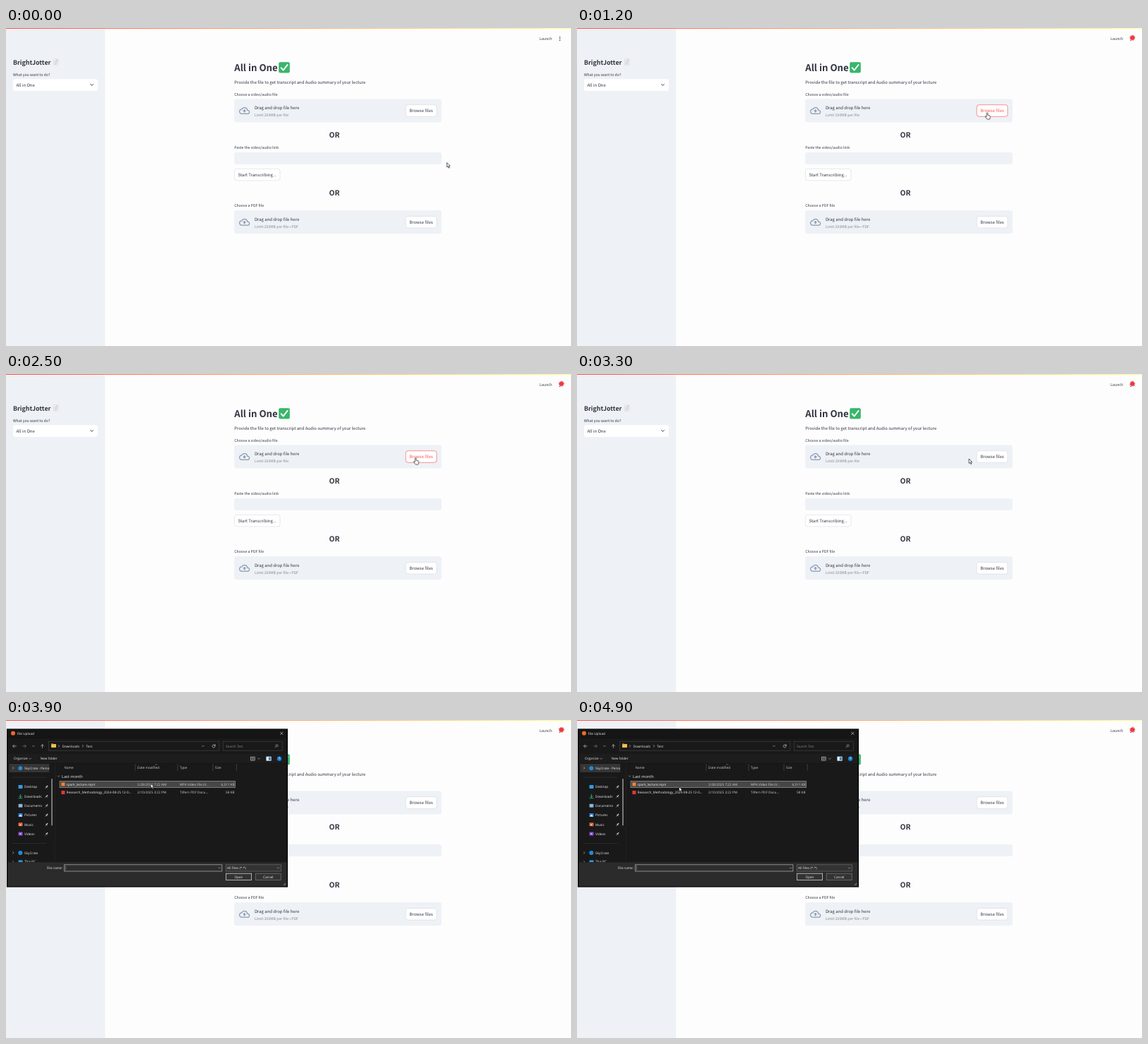
An HTML page that plays this animation: 800 px wide and 450 px high, repeating every 5 s.

```html
<!DOCTYPE html>
<html lang="en">
<head>
<meta charset="utf-8">
<title>Lecture upload</title>
<style>
html, body { margin: 0; width: 100%; height: 100%; overflow: hidden; background: #fdfdfe; }
svg { display: block; width: 800px; height: 450px; }
text { text-rendering: geometricPrecision; white-space: pre; }
.page { font-family: "Noto Sans CJK JP", "Noto Sans CJK SC", "Noto Sans CJK KR", "Noto Sans CJK", "Noto Sans", sans-serif; fill: #31333f; }
.win { font-family: "Open Sans", "Noto Sans", sans-serif; fill: #ececec; }
.line { fill: none; stroke-linecap: round; stroke-linejoin: round; }
</style>
</head>
<body>
<svg id="stage" viewBox="0 0 800 450" xmlns="http://www.w3.org/2000/svg"></svg>
<script>
const LOOP = 5000, STEP = 100;
const PANEL = '#eef1f5', RED = '#ff4b4b';
const BODY = 5.96, SMALL = 5.22;

const text = (cls, x, y, size, str, extra = '') =>
  `<text class="${cls}" x="${x}" y="${y}" font-size="${size}" ${extra}>${str}</text>`;
const page = (...a) => text('page', ...a);
const win = (x, y, str, extra = '', size = 4.7) => text('win', x, y, size, str, extra);
const rect = (x, y, w, h, fill, extra = '') =>
  `<rect x="${x}" y="${y}" width="${w}" height="${h}" fill="${fill}" ${extra}/>`;
const line = (d, stroke, w = .6) => `<path class="line" d="${d}" stroke="${stroke}" stroke-width="${w}"/>`;
const dot = (x, y, r, fill) => `<circle cx="${x}" cy="${y}" r="${r}" fill="${fill}"/>`;
const group = (id, body, extra = '') => `<g id="${id}" ${extra}>${body}</g>`;
const MID = 'text-anchor="middle"', END = 'text-anchor="end"';
const GREY = 'style="fill:#85878f"';

function button(id, x, y, w, label) {
  return group(id,
    rect(x, y, w, 16.6, '#fff', 'rx="3.3" stroke="#d5d7dc" stroke-width=".6"') +
    page(x + w / 2, y + 10.5, BODY, label, MID));
}

function dropzone(id, y, limit) {
  const cloud = 'M19.35 10.04A7.49 7.49 0 0 0 12 4C9.11 4 6.6 5.64 5.35 8.04A5.994 5.994 0 0 0 0 14c0 3.31 2.69 6 6 6h13' +
    'c2.76 0 5-2.24 5-5 0-2.64-2.05-4.78-4.65-4.96zM19 18H6c-2.21 0-4-1.79-4-4 0-2.05 1.53-3.76 3.56-3.97l1.07-.11.5-.95' +
    'A5.469 5.469 0 0 1 12 6c2.62 0 4.88 1.86 5.39 4.43l.3 1.5 1.53.11A2.98 2.98 0 0 1 22 15c0 1.65-1.35 3-3 3z' +
    'M8 13h2.55v3h2.9v-3H16l-4-4z';
  return rect(323.2, y, 293.6, 33, PANEL, 'rx="3.3"') +
    `<path d="${cloud}" fill="#8c9cb2" fill-rule="evenodd" transform="translate(330 ${y + 9}) scale(.635)"/>` +
    page(352, y + 14.9, BODY, 'Drag and drop file here') +
    page(352, y + 25, SMALL, limit, GREY) +
    button(id, 566, y + 8.3, 43.8, 'Browse files');
}

function pageView() {
  const sidebar = rect(0, 0, 140, 450, PANEL) +
    page(10, 51.5, 8.8, 'BrightJotter', 'font-weight="600"') +
    rect(67.5, 43.6, 6.6, 8.8, '#f8f9fb', 'rx=".6" stroke="#c3c9d2" stroke-width=".5"') +
    line('M69 46h2.4M69 47.8h3.6M69 49.4h3.6M69 51h2.4', '#9fabbd', .6) +
    rect(71.6, 44.8, 1.5, 1.6, '#e09aa6') +
    page(10, 67.8, SMALL, 'What you want to do?') +
    rect(10, 72.2, 120, 16.8, '#fff', 'rx="3.3"') +
    page(14.5, 82.9, BODY, 'All in One') +
    line('M119.7 79.6l1.8 1.8 1.8-1.8', '#31333f', 1);
  const main = page(323.2, 61.1, 13.2, 'All in One', 'font-weight="600"') +
    rect(386.2, 48.2, 15.6, 15.2, '#38b66a', 'rx="2"') +
    line('M389.6 56.4l3 3.2 6-7.6', '#fff', 2) +
    page(323.2, 79.2, BODY, 'Provide the file to get transcript and Audio summary of your lecture') +
    page(323.2, 95.8, SMALL, 'Choose a video/audio file') +
    dropzone('browse', 100.4, 'Limit 200MB per file') +
    page(465, 155, 10.2, 'OR', MID + ' font-weight="600"') +
    page(323.2, 171.3, SMALL, 'Paste the video/audio link') +
    rect(323.2, 176, 293.6, 16.7, PANEL, 'rx="3.3"') +
    button('start', 323.4, 199.3, 64.6, 'Start Transcribing...') +
    page(465, 237, 10.2, 'OR', MID + ' font-weight="600"') +
    page(323.2, 253.3, SMALL, 'Choose a PDF file') +
    dropzone('browsePdf', 258.1, 'Limit 200MB per file • PDF');
  const bar = rect(0, 0, 800, 1, 'url(#bar)') + page(755.2, 17.1, SMALL, 'Launch') +
    group('kebab', [12.8, 15.1, 17.4].map(y => dot(784.2, y, .75, '#31333f')).join('')) +
    '<path id="burst" fill="#ee3a3c"/>';
  return sidebar + main + bar;
}

function places() {
  const items = [['Desktop', '#2f9be8'], ['Downloads', '#2fae74'], ['Documents', '#6f9fc8'],
    ['Pictures', '#2f86dd'], ['Music', '#e2683c'], ['Videos', '#8a4fd0']];
  const icon = (i, y, c) => {
    if (i === 1) return line(`M20.5 ${y - 2.6}v4M18.7 ${y - .2}l1.8 1.8 1.8-1.8M18 ${y + 2.8}h5`, c, .9);
    const mark = i === 2 ? line(`M19 ${y - 1}h3M19 ${y + .8}h3`, '#fff', .5)
      : i === 3 ? `<path d="M18 ${y + 2}l2.5-2.8 2.5 2.8z" fill="#fff"/>`
      : i === 4 ? dot(20.3, y + .5, .9, '#fff')
      : i === 5 ? `<path d="M19.7 ${y - 1.2}v2.4l2-1.2z" fill="#fff"/>` : '';
    return rect(17.5, y - 2.5, 6, 5, c, 'rx=".8"') + mark;
  };
  const pin = y => line(`M55.6 ${y + 2}l1.6-1.6M56.4 ${y - .6}l2 2`, '#c9c9c9', .6) +
    line(`M57.3 ${y + .2}l1.5-1.5`, '#c9c9c9', 1.3);
  return items.map(([name, c], i) => {
    const y = 94.6 + i * 13.3;
    return icon(i, y, c) + win(26, y + 1.7, name) + pin(y);
  }).join('');
}

function dialogView() {
  const chev = (x, y, c = '#bbb') => line(`M${x - 1.4} ${y - .7}l1.4 1.4 1.4-1.4`, c);
  const next = (x, y) => line(`M${x - .7} ${y - 1.4}l1.4 1.4-1.4 1.4`, '#ccc');
  const box = (x, y, w, h, fill, stroke, sw = .6) => rect(x, y, w, h, fill, `stroke="${stroke}" stroke-width="${sw}"`);
  const head = rect(1, 12.4, 398, 224.2, '#0b0b0b') + rect(2.5, 13.5, 395, 12, '#151515') +
    dot(10, 18.8, 3, '#f0682c') + win(15.5, 20.6, 'File Upload') +
    line('M388.6 17.2l3.4 3.4M392 17.2l-3.4 3.4', '#eee') +
    rect(2.5, 25.5, 395, 22.5, '#191919') +
    line('M14.3 37h-4.6M11.6 35l-2 2 2 2M49.5 36.8l2-2 2 2M51.5 35v4.4', '#ddd') +
    line('M23.7 37h4.6M26.4 35l2 2-2 2', '#888') + chev(39, 37) +
    box(60.3, 30.2, 241.6, 13, '#191919', '#484848') +
    rect(64, 34, 7, 5, '#f2c04c', 'rx=".7"') + rect(64, 33.4, 3, 1.6, '#d99a2b') +
    next(75, 36.8) + win(79.5, 38.5, 'Downloads') + next(109, 36.8) + win(113.3, 38.5, 'Test') +
    chev(279, 37) + line('M296 36.1a2.1 2.1 0 1 0 .1 1.6M296.2 34.6v1.7h-1.7', '#ddd') +
    box(307.2, 30.2, 84, 13, '#191919', '#484848') +
    win(311, 38.5, 'Search Test', 'style="fill:#858585"') +
    `<circle cx="383.6" cy="36.2" r="1.5" fill="none" stroke="#bbb" stroke-width=".6"/>` + line('M382.5 37.3l-1.5 1.6', '#bbb');
  const tools = rect(2.5, 48, 395, 13.3, '#1d1d1d') +
    box(368.8, 52, 6.4, 5.4, '#e8eef4', '#e8eef4') + rect(371.8, 52.6, 3, 4.2, '#2b84c8') +
    dot(387, 54.7, 3.2, '#1683d8') + win(387, 56.4, '?', MID + ' font-weight="700"');
  const body = rect(2.5, 61.3, 395, 140, '#191919') +
    line('M69.2 62v138', '#2d2d2d', .5) +
    line('M183 62.5v9M243 62.5v9M293 62.5v9M326.3 62.5v9', '#555', .6) +
    [[82.5, 'Name'], [186, 'Date modified'], [246, 'Type'], [296, 'Size']]
      .map(([x, s]) => win(x, 68.5, s, 'style="fill:#d2d2d2"')).join('') +
    rect(4.5, 62, 56.8, 12, '#353535') + next(10.3, 68) + dot(20.3, 68.2, 3, '#2389d8') +
    `<g clip-path="url(#side)">` + win(26, 69.7, 'SkyCrate - Personal') +
    next(10.3, 187.8) + dot(20.3, 188, 3, '#2389d8') + win(26, 189.5, 'SkyCrate') +
    next(10.3, 201) + rect(17.5, 198.5, 6, 4, '#2f9be8') + win(26, 202.2, 'This PC') + '</g>' +
    line('M9 81.2h48M9 174.5h48', '#3a3a3a', .5) + places() +
    rect(64.3, 83, 1.4, 66.5, '#a2a2a2', 'rx=".7"');
  const foot = rect(2.5, 201.2, 395, 34, '#2b2b2b') +
    win(80, 210.8, 'File name:', END) +
    box(82.3, 204.8, 223.6, 9.2, '#2d2d2d', '#b5b5b5', .7) + line('M84.3 206.7v5.4', '#eee', .4) +
    chev(302.5, 209.5) +
    box(311.2, 204.8, 78.2, 9.2, '#333', '#777') + win(313, 210.8, 'All Files (*.*)') + chev(385.5, 209.5) +
    box(311.4, 217.2, 36.2, 9.4, '#333', '#d0d0d0', .8) + win(329.4, 223.6, 'Open', MID) +
    box(353.2, 217.2, 36, 9.4, '#333', '#858585') + win(371.3, 223.6, 'Cancel', MID) +
    line('M393 233.8l2.8-2.8M394.7 233.8l1.1-1.1', '#aaa', .7);

  const row = (y, name, date, type, size) =>
    win(85.5, y, name) + win(186, y, date, 'style="fill:#d2d2d2"') +
    win(246, y, type, 'style="fill:#d2d2d2"') + win(323.5, y, size, END + ' style="fill:#d2d2d2"');
  const files = win(11, 56.4, 'Organize') + chev(34.2, 54.8) + win(48.7, 56.4, 'New folder') +
    box(346.5, 52.2, 5.6, 5, 'none', '#ccc') + line('M346.5 53.9h5.6M346.5 55.5h5.6M349.3 52.2v5', '#ccc', .4) +
    chev(358, 54.8) + line('M211.4 63.6l1.2-1.2 1.2 1.2', '#aaa', .5) +
    rect(70, 74, 327.4, 10.9, '#444', 'id="headHover"') +
    box(76, 86.3, 248.6, 9.4, '#474747', '#a8a8a8').replace('<rect', '<rect id="rowHover"') +
    chev(74.6, 79.6) + win(79, 81.6, 'Last month', '', 5.65) +
    rect(78.4, 88.4, 5, 5, '#f08332') + rect(78.4, 100.1, 5, 5, '#e03a36') +
    row(92.8, 'spark_lecture.mp4', '2/28/2025 7:22 AM', 'MP4 Video File (V...', '6,311 KB') +
    row(104.4, 'Research_Methodology_2024-08-25 12-0...', '2/10/2025 3:22 PM', 'Tilfern PDF Docu...', '58 KB');
  return head + tools + body + foot +
    group('loading', win(233, 82.8, 'Working on it...', MID)) + group('files', files);
}

const outline = 'fill="#fff" stroke="#1c1c1c" stroke-width=".7" stroke-linejoin="round"';
const arrow = `<path id="arrow" ${outline} d="M0 0V6.4L1.5 5.1 2.6 7.6 3.7 7.1 2.6 4.7H4.5z"/>`;
const hand = `<path id="hand" ${outline} d="M-.9 .8a.9.9 0 0 1 1.8 0V3.4l2.2.5q1.3.3 1.2 1.6l-.4 2.8q-.1.8-.8.8H.2q-.6 0-.9-.5L-2.8 5.6q-.2-.7.5-.9l1.4.7z"/>`;

document.getElementById('stage').innerHTML =
  `<defs><linearGradient id="bar"><stop stop-color="#ff4b4b"/><stop offset="1" stop-color="#fffd80"/></linearGradient>
  <clipPath id="side"><rect x="3" y="61" width="58.3" height="140.2"/></clipPath></defs>` +
  rect(0, 0, 800, 450, '#fdfdfe') + pageView() + group('dialog', dialogView()) +
  group('pointer', arrow + hand);

const el = id => document.getElementById(id);
const show = (id, on) => el(id).setAttribute('display', on ? 'inline' : 'none');

// pointer keys: time, x, y
const path = [[0, 624.3, 190.5], [100, 622, 187], [400, 596, 143], [700, 582, 122], [800, 581.3, 120.8],
  [1800, 580.3, 118.8], [3000, 580, 119], [3100, 577, 119.5], [3300, 555, 120], [3500, 459.5, 115.2],
  [3800, 300, 100], [3900, 205, 90], [4100, 158, 85], [4200, 149, 85], [4300, 147, 85.2], [4900, 144.6, 94.6]];
const still = [3400, 3600, 3700, 4000, 4400, 4700];

function pointerAt(t) {
  const i = path.findIndex(k => k[0] >= t);
  if (i < 1) return path[0].slice(1);
  const [a, b] = [path[i - 1], path[i]], f = (t - a[0]) / (b[0] - a[0]);
  return [a[1] + (b[1] - a[1]) * f, a[2] + (b[2] - a[2]) * f];
}

function burst(t) {
  const small = t % 1200 >= 400 && t % 1200 < 800;
  if (small) return 'M783.4 11h2.6l.8.6h2.4v4.8h-2.8l-.8-.6h-2.2z';
  const pts = Array.from({ length: 18 }, (_, k) => {
    const r = k % 2 ? 2.8 : 4.5 + .4 * Math.sin(k * 2 + t / 200), a = k * Math.PI / 9;
    return (786.5 + r * Math.cos(a)).toFixed(2) + ' ' + (13.8 + r * Math.sin(a)).toFixed(2);
  });
  return 'M' + pts.join('L') + 'z';
}

function draw(ms) {
  let t = Math.floor(ms / STEP) * STEP;
  while (still.includes(t)) t -= STEP;
  const [x, y] = pointerAt(t);
  const open = t >= 3500, loaded = t >= 3800;
  const hover = !open && x > 566 && x < 610 && y > 108.7 && y < 125.3;

  el('pointer').setAttribute('transform', `translate(${x} ${y})`);
  show('arrow', !hover);
  show('hand', hover);
  const [edge, label] = el('browse').children;
  edge.setAttribute('stroke', hover ? RED : '#d5d7dc');
  label.style.fill = hover ? RED : '';

  const busy = t >= 300;
  show('burst', busy);
  if (busy) el('burst').setAttribute('d', burst(t));

  show('dialog', open);
  show('loading', !loaded);
  show('files', loaded);
  show('headHover', y >= 74 && y < 86);
  show('rowHover', y >= 86 && y < 96.5);
}

function tick(now) {
  draw(now % LOOP);
  requestAnimationFrame(tick);
}
draw(0);
requestAnimationFrame(tick);
</script>
</body>
</html>
```
